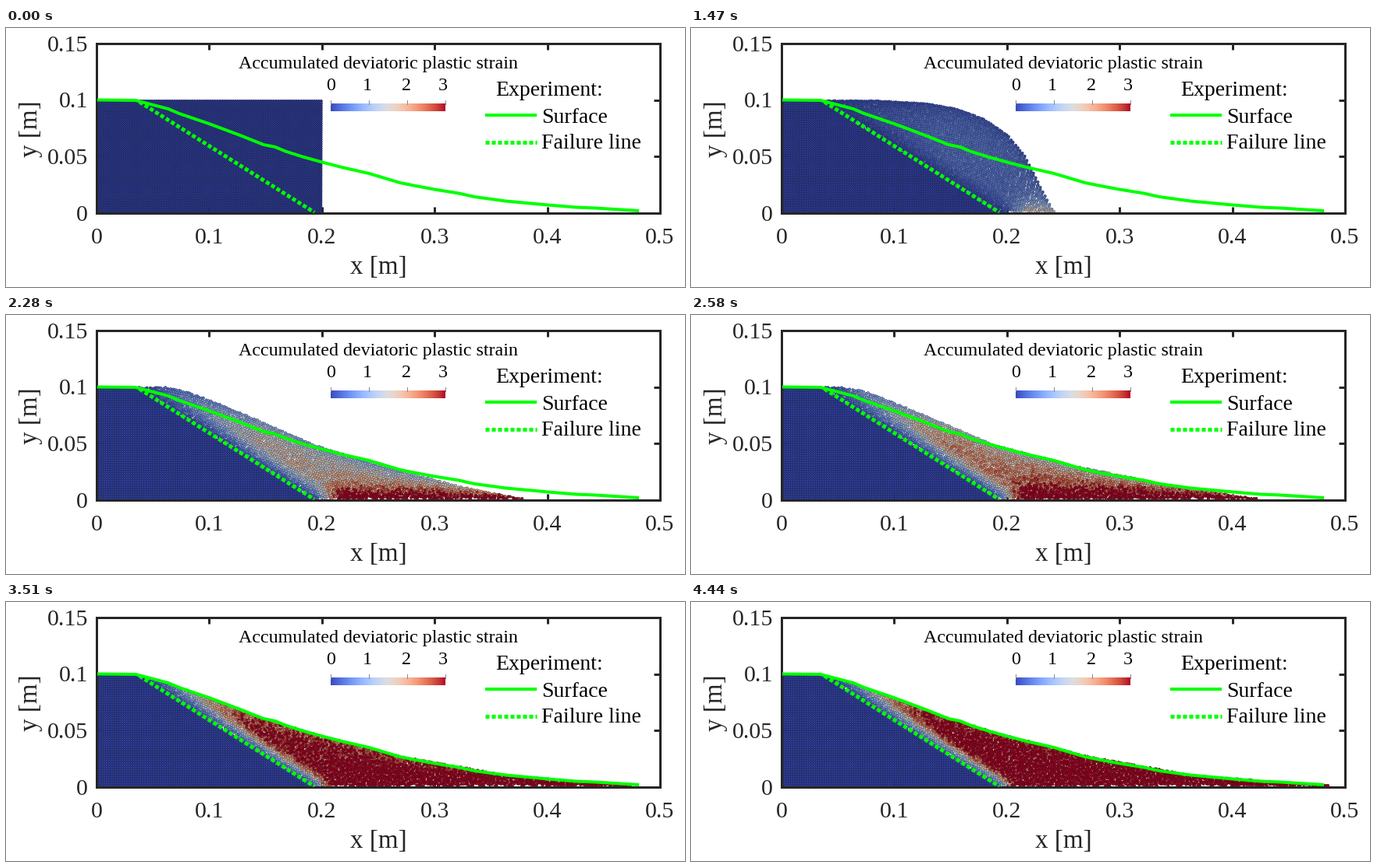
Recreate the animation shown at these times as a matplotlib script. Size 870 px wide and 333 px high, loop 5010 ms.

```python
import numpy as np
import matplotlib.pyplot as plt
from matplotlib.animation import FuncAnimation

W, H, DPI = 870, 333, 64  # a power of two keeps the pixel size exact
LEFT, TOP, RIGHT, BOTTOM = 116, 20, 838, 237.5
SX, SY = (RIGHT - LEFT) / 0.5, (BOTTOM - TOP) / 0.15
PT = 72 / DPI
STEP, LOOP = 30, 5010
INK, GREEN = "#262626", "#00ff00"
SP = 0.002  # particle spacing in metres
plt.rcParams["font.family"] = "Liberation Serif"


def to_xy(pts):
    p = np.asarray(pts, float)
    return (p[:, 0] - LEFT) / SX, (BOTTOM - p[:, 1]) / SY


# Simulation output times: (first, last, count) in ms
SPANS = [(1050, 1470, 5), (1590, 2070, 6), (2190, 2670, 6),
         (2760, 3180, 5), (3300, 3810, 6), (3930, 4440, 7)]
TIMES = np.concatenate([np.floor(np.linspace(*s) / STEP + 0.5) * STEP for s in SPANS])

# Free surface at key steps, in stage pixels
KEYS = [0, 1, 5, 10, 16, 22, 28]
SHAPES = np.array([
    [(250, 92.5), (300, 92.5), (350, 92.5), (380, 92.5), (400, 92.5), (405.5, 92.5), (405.8, 165), (406, 237)],
    [(240, 92.5), (300, 93), (350, 93.5), (380, 94.3), (400, 95), (407, 97), (408, 165), (409, 237)],
    [(236, 92.5), (300, 96), (340, 103), (375, 116), (405, 136), (428, 164), (449, 206), (465, 236)],
    [(217, 92.5), (240, 98), (280, 113), (330, 134), (400, 166), (480, 197), (550, 221), (597, 236)],
    [(192, 92.5), (220, 97), (250, 108), (310, 133), (390, 167), (490, 193), (620, 220), (726, 236)],
    [(165, 92.5), (208, 104), (260, 123), (330, 150), (405, 172), (505, 198), (640, 222), (784, 236)],
    [(165, 92.5), (208, 104), (260, 123), (330, 149), (400, 170), (505, 197), (640, 222), (817, 236)],
])

SURFACE = [(117, 92.5), (166, 93), (185, 98), (208, 104), (222, 110), (260, 123),
           (300, 138), (330, 150), (345, 153), (358, 158.5), (380, 165.5), (405, 172.5),
           (430, 179), (465, 187), (505, 199), (525, 203), (549, 207.5), (580, 212.5),
           (600, 217), (640, 222.5), (694, 227.5), (730, 230.5), (755, 231.5), (811, 235)]
FAILURE = [(171, 95), (395, 237)]
fail_x, fail_y = to_xy(FAILURE)
SLOPE = (fail_y[1] - fail_y[0]) / (fail_x[1] - fail_x[0])

rng = np.random.default_rng(4)
ROW, COL = np.mgrid[0:50, -60:260]
JITTER = rng.uniform(-1, 1, (3,) + ROW.shape)
GRID_X, GRID_Y = ((g.ravel() + 0.5) * SP for g in np.meshgrid(np.arange(100), np.arange(50)))


def fail_line(x):
    return fail_y[0] + SLOPE * (x - fail_x[0])


def base(x):
    return np.clip(fail_line(x), 0, 0.1)


def smooth(v):
    v = np.clip(v, 0, 1)
    return v * v * (3 - 2 * v)


def strain(x, y, h, k):
    px = LEFT + x * SX
    above = (y - fail_line(x)) * SY
    depth = np.maximum(h - y, 0) * SY
    amp = np.interp(k, [0, 1, 5, 10, 16, 22, 28, 35], [0, 0.01, 0.12, 0.33, 0.62, 0.9, 1.04, 1.1])
    skin = np.interp(k, [5, 10, 16, 22, 28], [0.7, 0.6, 0.5, 0.35, 0.28])
    floor = np.interp(k, [1, 5, 10], [0, 0.5, 1])
    c = 3.6 * amp * smooth((above + 6) / 36) * (0.35 + 0.65 * np.clip((px - 180) / 150, 0, 1))
    c *= 1 - skin * np.exp(-depth / 12)
    return c + 3 * floor * np.exp(-y * SY / 12) * smooth((px - 395) / 45)


def particles(k):
    """Positions and colours of all grains at output step k."""
    pts = [[np.interp(k, KEYS, SHAPES[:, n, a]) for a in (0, 1)] for n in range(8)]
    sx, sy = to_xy(pts)
    front = sx[-1]

    # sliding mass: rows parallel to the free surface, the upper ones faster
    loose = 0.27 * SP * min(1, k / 9)
    x = (COL + 0.5) * SP + 0.35 * (front - 0.2) * (1 - ROW / 50) + loose * JITTER[0]
    h = np.interp(x, sx, sy, left=0.1)
    y = h - (ROW + 0.5) * SP + loose * JITTER[1]
    y = np.where(ROW == 0, np.maximum(y, SP / 2), y)
    moving = (x > 0) & (x <= front) & (y >= np.maximum(base(x), SP * 0.3))
    noise = 1 + 0.22 * JITTER[2][moving]
    x, y, h = x[moving], y[moving], h[moving]
    c = strain(x, y, h, k) * noise

    # resting wedge
    gh = np.interp(GRID_X, sx, sy, left=0.1)
    rest = (GRID_Y < base(GRID_X)) & (GRID_Y < gh)
    gx, gy = GRID_X[rest], GRID_Y[rest]
    gc = strain(gx, gy, gh[rest], k)

    rgb = plt.cm.coolwarm(np.concatenate([gc, c]) / 3)
    face, edge = rgb.copy(), rgb.copy()
    face[:, :3] *= np.interp(k, [0, 12], [0.72, 0.86])
    edge[:, :3] *= 0.5
    return np.column_stack([np.concatenate([gx, x]), np.concatenate([gy, y])]), face, edge


fig = plt.figure(figsize=(W / DPI, H / DPI), dpi=DPI, facecolor="white")
ax = fig.add_axes([LEFT / W, 1 - BOTTOM / H, (RIGHT - LEFT) / W, (BOTTOM - TOP) / H])
ax.set(xlim=(0, 0.5), ylim=(0, 0.15), xticks=np.arange(6) / 10, yticks=np.arange(4) / 20)
ax.set_axisbelow(True)
ax.tick_params(direction="in", length=8 * PT, width=3 * PT, color=INK, top=True, right=True,
               labelbottom=False, labelleft=False)
for spine in ax.spines.values():
    spine.set(linewidth=3 * PT, color=INK)


def label(x, y, text, size, color="black", **kw):
    kw = {"ha": "center", "va": "baseline", **kw}
    fig.text(x / W, 1 - y / H, text, fontsize=size * PT, color=color, **kw)


def line(pts, dotted=False):
    style = (0, (1, 0.6)) if dotted else "-"
    ax.plot(*to_xy(pts), color=GREEN, lw=(5 if dotted else 4) * PT, ls=style,
            dash_capstyle="butt", solid_capstyle="butt", zorder=4)


for v in range(6):
    label(LEFT + v * SX / 10, 277, f"{v / 10:g}", 30, INK)
for v in range(4):
    label(105, BOTTOM - v * SY / 20 + 10, f"{v / 20:g}", 30, INK, ha="right")
label(477, 316, "x [m]", 33, INK)
label(32, 130, "y [m]", 33, INK, rotation=90, va="center")

label(477.5, 52, "Accumulated deviatoric plastic strain", 24)
for x, text in zip((416, 463, 513, 560), "0123"):
    label(x, 80, text, 24)
label(627, 87, "Experiment:", 27.7, ha="left")
label(686, 122, "Surface", 27.7, ha="left")
label(686, 155, "Failure line", 27.7, ha="left")

bar_x, bar_y = to_xy([(416, 107), (563, 97)])
ax.imshow(np.linspace(0, 1, 256)[None], cmap="coolwarm", aspect="auto", zorder=3,
          extent=(*bar_x, *bar_y))
ax.set(xlim=(0, 0.5), ylim=(0, 0.15))
for x in np.linspace(416, 563, 4):
    ax.plot(*to_xy([(x, 93), (x, 98)]), color="#888888", lw=PT, zorder=3.1)

dots = ax.scatter([], [], s=(3.3 * PT) ** 2, marker="8", linewidths=0.8 * PT, zorder=2)
line(SURFACE)
line(FAILURE, dotted=True)
line([(614, 112), (680, 112)])
line([(614, 147), (680, 147)], dotted=True)

STATES = [particles(k) for k in range(len(TIMES) + 1)]


def update(i):
    pos, face, edge = STATES[np.searchsorted(TIMES, i * STEP, side="right")]
    dots.set_offsets(pos)
    dots.set_facecolor(face)
    dots.set_edgecolor(edge)
    return (dots,)


anim = FuncAnimation(fig, update, frames=LOOP // STEP, interval=STEP, repeat=True,
                     repeat_delay=0, blit=False)
plt.show()
```
